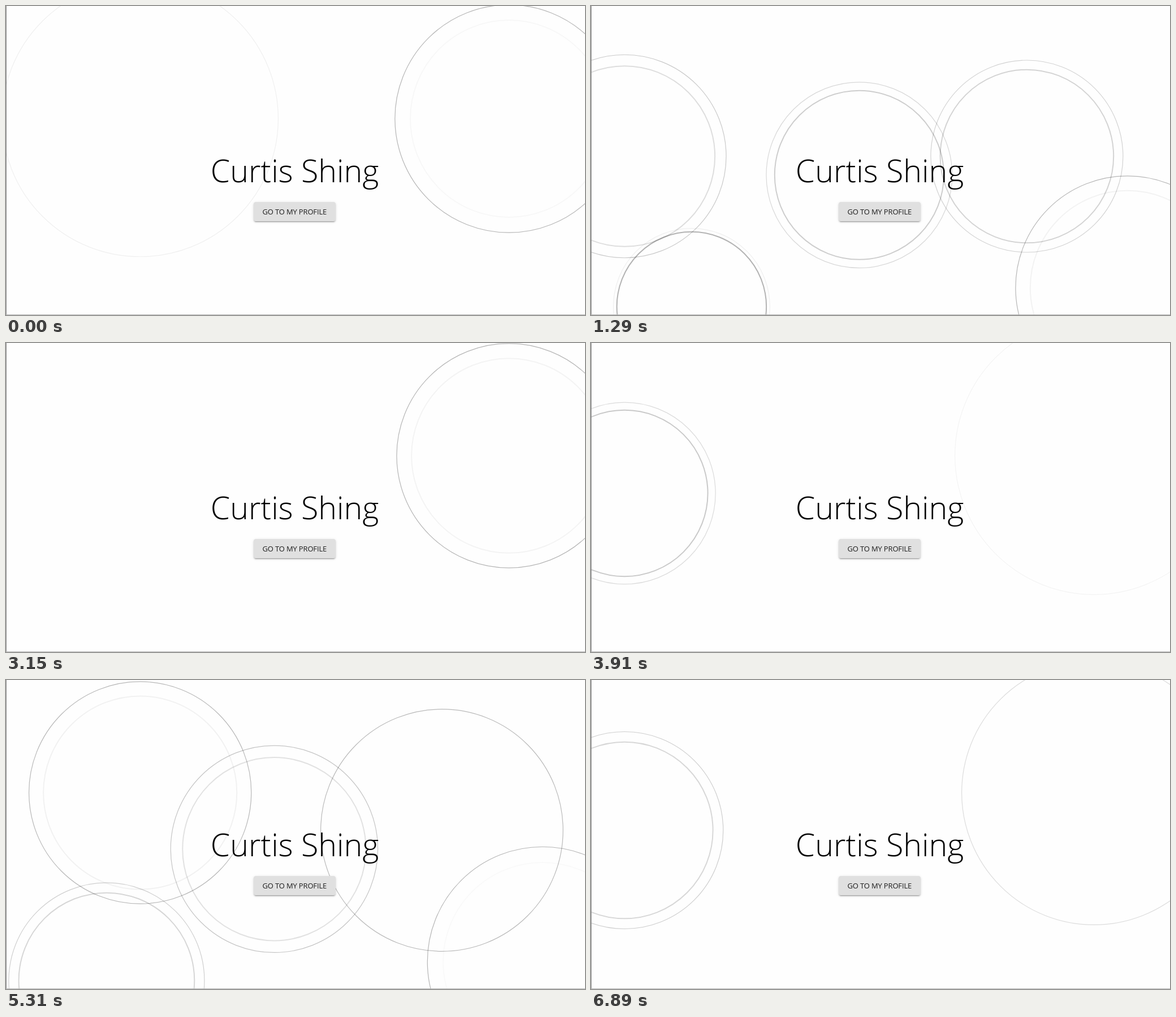
An HTML page for the animation above (6.91 s loop, 1024 px wide and 547 px high).

```html
<!DOCTYPE html>
<html lang="en">
<head>
<meta charset="utf-8">
<title>Profile</title>
<style>
  html, body { margin: 0; width: 100%; height: 100%; overflow: hidden; background: #fefefe; }
  body { font-family: "Open Sans", "Noto Sans", sans-serif; }
  svg, h1, .button { position: absolute; }
  svg { left: 0; top: 0; }
  h1 {
    left: 0; top: 261px; width: 1021px; margin: 0;
    font-size: 55.5px; font-weight: 300; line-height: 60px;
    text-align: center; color: #000;
  }
  .button {
    left: 438px; top: 347px; width: 144.5px; height: 34px;
    border-radius: 4px; background: #e0e0e0; color: rgba(0, 0, 0, .87);
    font-size: 13px; line-height: 34px; letter-spacing: -.15px;
    text-align: center; white-space: nowrap;
    box-shadow: 0 3px 1px -2px rgba(0,0,0,.2), 0 2px 2px rgba(0,0,0,.14), 0 1px 5px rgba(0,0,0,.12);
  }
</style>
</head>
<body>
<svg width="1024" height="547">
  <g id="rings" fill="none" stroke="#000"></g>
  <path d="M.5 0V547" stroke="#8c8c8c"/>
  <path d="M0 546.5H1024" stroke="#b4b4b4"/>
</svg>
<h1>Curtis Shing</h1>
<div class="button">GO TO MY PROFILE</div>
<script>
const LOOP = 6910;
const CELL_X = 59.3, CELL_Y = 33.25;
const group = document.getElementById("rings");

function addRing(x, y, width) {
  const ring = document.createElementNS("http://www.w3.org/2000/svg", "circle");
  ring.setAttribute("cx", x);
  ring.setAttribute("cy", y);
  ring.setAttribute("stroke-width", width);
  return group.appendChild(ring);
}

function setRing(ring, radius, alpha) {
  ring.setAttribute("r", radius);
  ring.setAttribute("stroke-opacity", alpha);
}

// Grid column, grid row and start in ms; each ripple is slower than the one before
const ripples = [
  [1, 8, 668], [4, 6, -1590], [15, 6, -1000], [13, 8, 680],
  [3, 16, 1066], [8, 9, 695], [16, 15, 127]
].map(([column, row, start], i) => {
  const x = column * CELL_X, y = row * CELL_Y;
  return { start, period: 2830 + 182 * i, outer: addRing(x, y, 1.2), inner: addRing(x, y, 2) };
});

// Rises from 0 to peak at a, holds to b, falls to 0 at c
const fade = (p, a, b, c, peak) =>
  peak * Math.max(0, Math.min(1, p / a, (c - p) / (c - b)));

function draw(t) {
  for (const { start, period, outer, inner } of ripples) {
    const turns = (t - start) / period;
    const p = turns - Math.floor(turns);
    const radius = 308 - (13.71 - 10.84 * p) ** 2;
    setRing(outer, radius, fade(p, .3, .36, .57, .29));
    setRing(inner, 40 + radius * 2 / 3, fade(p, .06, .06, .34, .3));
  }
}

function frame() {
  draw(performance.now() % LOOP);
  requestAnimationFrame(frame);
}
frame();
</script>
</body>
</html>
```
